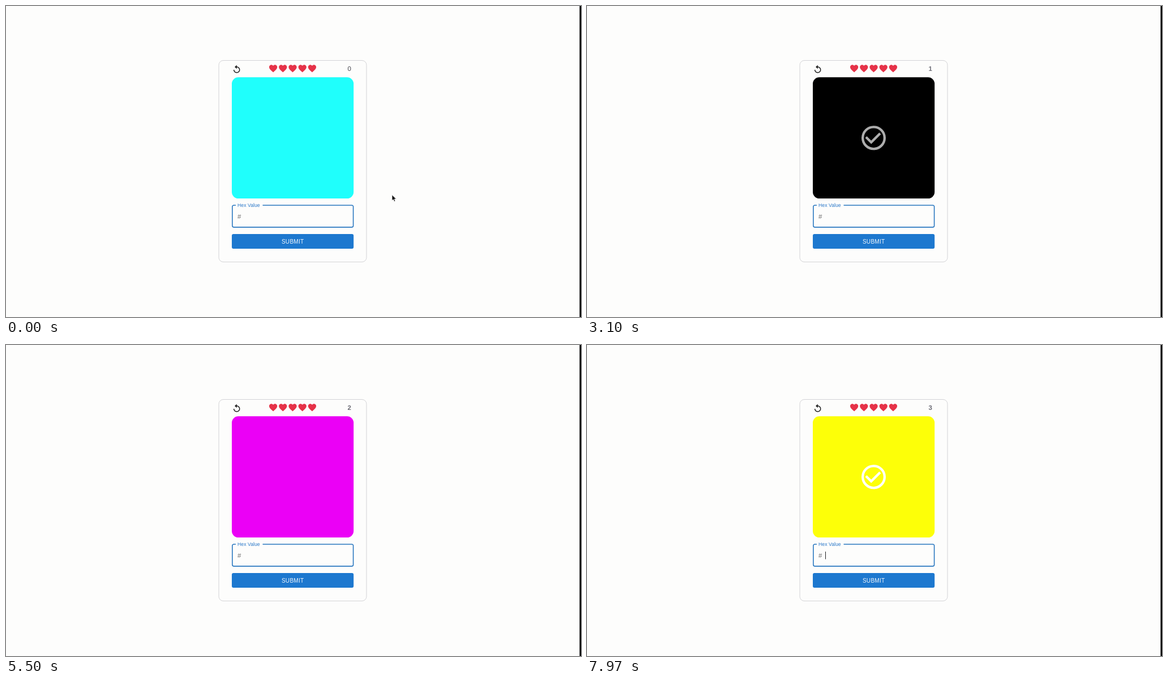
Recreate the animation shown at these times as an HTML page. Size 1016 by 551 pixels, loop 8 s.

```html
<!DOCTYPE html>
<html lang="en">
<head>
<meta charset="utf-8">
<title>Hex colour game</title>
<style>
  html, body { margin: 0; width: 100%; height: 100%; overflow: hidden; background: #fdfdfc; }
  svg { display: block; width: 1016px; height: 551px; }
  text { font-family: "Liberation Sans", Arial, sans-serif; font-size: 11.5px; letter-spacing: .1px; white-space: pre; }
  .label { font-size: 8.6px; letter-spacing: .08px; fill: #2a78c8; }
  .submit { font-size: 10.04px; letter-spacing: .287px; fill: #f4f8fc; }
  .value { fill: #2b2b2b; }
  .hash { fill: #6a6a6a; }
</style>
</head>
<body>
<svg viewBox="0 0 1016 551">
  <defs>
    <path id="heart" fill="#e63248" d="M12 21.35l-1.45-1.32C5.4 15.36 2 12.28 2 8.5 2 5.42 4.42 3 7.5 3c1.74 0 3.41.81 4.5 2.09C13.09 3.81 14.76 3 16.5 3 19.58 3 22 5.42 22 8.5c0 3.78-3.4 6.86-8.55 11.54z"/>
  </defs>

  <rect x="1013.5" width="2.5" height="551" fill="#000"/>
  <rect x="376" y="96.5" width="261" height="357" rx="8" fill="none" stroke="#d3d3d6"/>

  <path transform="translate(399.1 103.7) scale(.717)" fill="#1c1c1c" d="M12 5V1L7 6l5 5V7c3.31 0 6 2.69 6 6s-2.69 6-6 6-6-2.69-6-6H4c0 4.42 3.58 8 8 8s8-3.58 8-8-3.58-8-8-8z"/>
  <g id="lives" transform="translate(463.5 102.2) scale(.717)"></g>
  <text id="score" x="606.7" y="115.2" text-anchor="middle"></text>

  <rect id="swatch" x="399" y="126.3" width="215.2" height="214.8" rx="11.5"/>
  <g id="check" transform="translate(506.5 233.7) scale(2.15)" fill="none" stroke="#fff" stroke-width="2">
    <circle r="9"/>
    <path d="M-6.3 -.7L-2 3.6 5.3 -3.7"/>
  </g>

  <path d="M453.5 353H611a2.6 2.6 0 0 1 2.6 2.6V389.3a2.6 2.6 0 0 1-2.6 2.6H402.5a2.6 2.6 0 0 1-2.6-2.6V355.6a2.6 2.6 0 0 1 2.6-2.6H406" fill="none" stroke="#2a78c0" stroke-width="1.6"/>
  <text class="label" x="409" y="355.6">Hex Value</text>
  <text class="hash" x="409" y="376.7">#</text>
  <text id="value" class="value" x="421" y="376.7"></text>
  <rect id="caret" y="366" width="1" height="13.5" fill="#222"/>

  <rect x="399" y="404" width="215.2" height="26" rx="2.9" fill="#1d78cf"/>
  <text class="submit" x="506.7" y="420.7" text-anchor="middle">SUBMIT</text>

  <path id="pointer" transform="translate(682 334.6)" d="M0 0V10.2L2.4 8.1 4 11.8 5.9 11 4.3 7.4H7.6z" fill="#111" stroke="#fff" stroke-width=".8"/>
</svg>
<script>
  const LOOP = 8000, BLINK = 500, REVEAL = 470, FADE_IN = 120, FADE_OUT = 190;
  const $ = id => document.getElementById(id);

  const rounds = [
    { color: '#1ffffc', answer: '0ff', keys: [1230, 1540, 1800], submit: 2530 },
    { color: '#000000', answer: '000', keys: [3640, 3800, 3970], submit: 4640 },
    { color: '#eb00f6', answer: 'f0f', keys: [6400, 6720, 7000], submit: 7480 },
    { color: '#fdff08', answer: '', keys: [], submit: Infinity }
  ];
  const edits = [-500, ...rounds.flatMap(r => [...r.keys, r.submit])];

  $('lives').innerHTML = [0, 1, 2, 3, 4].map(i => `<use href="#heart" x="${i * 24}"/>`).join('');

  const clamp = v => Math.max(0, Math.min(1, v));
  const checkOpacity = age =>
    age < 0 ? 0 : Math.min(clamp(age / FADE_IN), 1 - clamp((age - REVEAL - 40) / FADE_OUT));

  function draw(t) {
    const round = rounds.find(r => t < r.submit + REVEAL);
    const score = rounds.filter(r => t >= r.submit).length;
    const typed = t < round.submit ? round.keys.filter(k => t >= k).length : 0;
    const lastEdit = Math.max(...edits.filter(e => e <= t));

    $('swatch').setAttribute('fill', round.color);
    $('check').setAttribute('opacity', Math.max(...rounds.map(r => checkOpacity(t - r.submit))));
    $('score').textContent = score;
    $('score').setAttribute('font-weight', score ? 700 : 400);
    $('score').setAttribute('fill', score ? '#6b6b74' : '#45454d');

    const value = $('value');
    value.textContent = round.answer.slice(0, typed);
    $('caret').setAttribute('x', 421 + (typed ? value.getComputedTextLength() - .3 : 0));
    $('caret').setAttribute('opacity', (t - lastEdit) % (2 * BLINK) < BLINK ? 1 : 0);
    $('pointer').setAttribute('opacity', t < 1900 ? 1 : 0);
  }

  const start = performance.now();
  function tick() {
    draw((performance.now() - start) % LOOP);
    requestAnimationFrame(tick);
  }
  tick();
</script>
</body>
</html>
```
